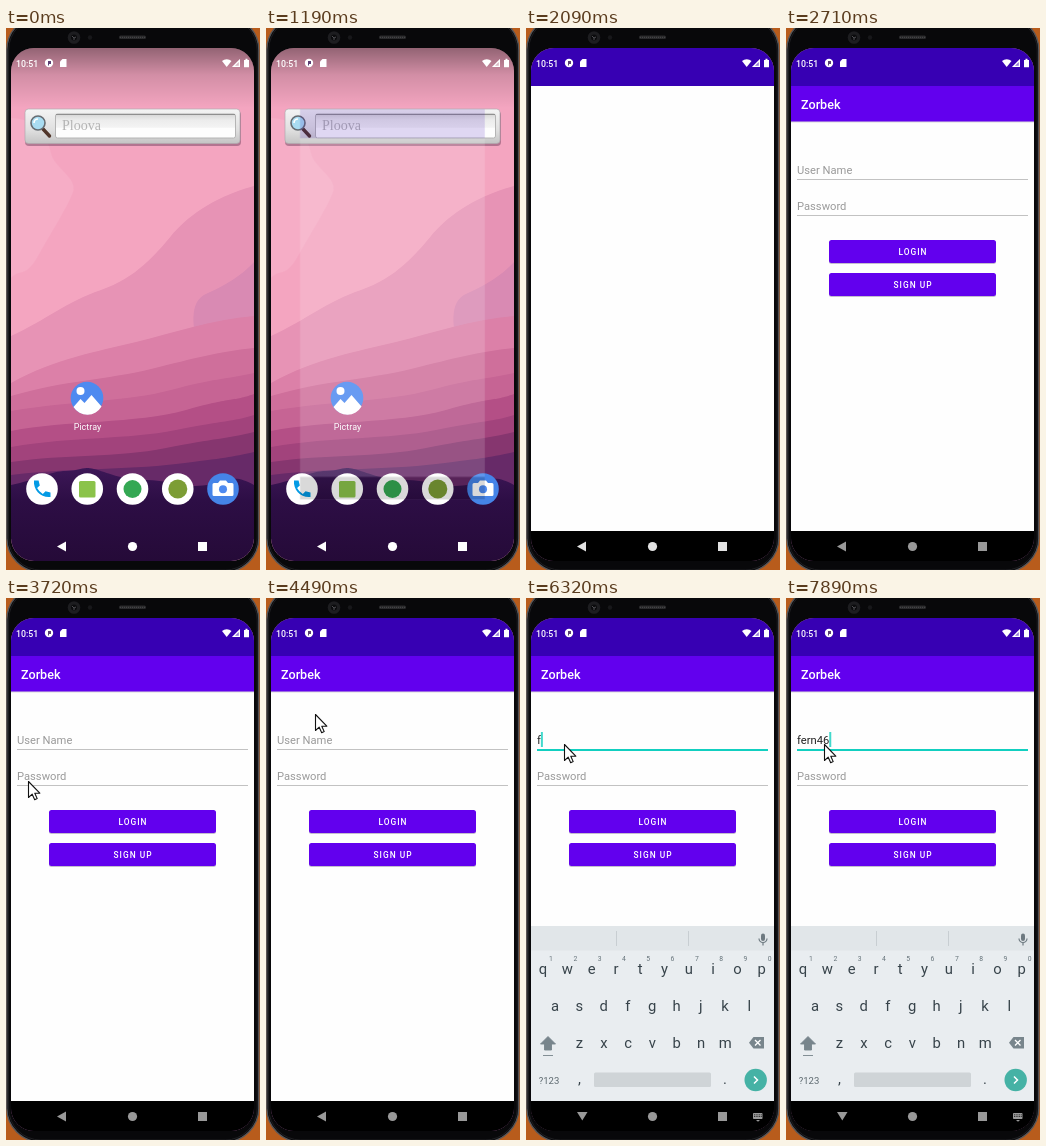
An HTML page for the animation above (8 s loop, 254 px wide and 542 px high).

```html
<!DOCTYPE html>
<html lang="en">
<head>
<meta charset="utf-8">
<title>Phone login</title>
<style>
  html, body { margin: 0; width: 100%; height: 100%; overflow: hidden; background: #b85c1c; }
  svg { display: block; width: 254px; height: 542px; font-family: Roboto, sans-serif; }
  .mid { text-anchor: middle; }
  .medium { font-weight: 500; }
  .serif { font-family: "Liberation Serif", "Noto Serif", serif; }
</style>
</head>
<body>
<svg viewBox="0 0 254 542">
  <defs>
    <clipPath id="screen"><rect x="5" y="20" width="243" height="513" rx="23"/></clipPath>
    <linearGradient id="scrim" x2="0" y2="1">
      <stop offset="0" stop-opacity=".4"/><stop offset=".45" stop-opacity=".14"/>
      <stop offset="1" stop-opacity="0"/>
    </linearGradient>
    <linearGradient id="hills" x2="0" y2="1">
      <stop offset="0" stop-color="#3d1757"/><stop offset=".35" stop-color="#2d0e45"/>
      <stop offset="1" stop-color="#250a38"/>
    </linearGradient>
    <linearGradient id="silver" x2="0" y2="1">
      <stop offset="0" stop-color="#f4f4f4"/><stop offset=".6" stop-color="#e0e0e0"/>
      <stop offset="1" stop-color="#c4c4c4"/>
    </linearGradient>
    <linearGradient id="inset" x2="0" y2="1">
      <stop offset="0" stop-color="#d6d6d6"/><stop offset=".25" stop-color="#ececec"/>
      <stop offset=".55" stop-color="#f3f3f3"/><stop offset=".6" stop-color="#fdfdfd"/>
    </linearGradient>
  </defs>

  <!-- phone body -->
  <rect x=".8" y="-12" width="252" height="556" rx="34" fill="#08080a" stroke="#55565a" stroke-width="1.4"/>
  <rect x="2.6" y="-10" width="248.6" height="552" rx="32" fill="none" stroke="#1e1e21"/>
  <circle cx="68" cy="9.5" r="6.3" fill="#1d1d20"/>
  <circle cx="68" cy="9.5" r="3" fill="#0b0b0d"/>
  <path d="M66 8l2 2 2-1M68 10v2" stroke="#55555a" stroke-width=".9" fill="none"/>
  <circle cx="84" cy="9.5" r="2.2" fill="#17171a"/>
  <rect x="113" y="7.5" width="27" height="3.6" rx="1.5" fill="#29292b"/>
  <path d="M114 9.3h25" stroke="#4b4b4e" stroke-dasharray="1 1"/>

  <g clip-path="url(#screen)">
    <g id="home">
      <rect x="5" y="20" width="243" height="513" fill="#f4a5c0"/>
      <path d="M5 90C30 90 42 110 45 125S72 150 67 164 45 205 32 228 14 240 5 250Z" fill="#f6adc6"/>
      <path d="M5 308C40 292 60 274 95 262S150 226 165 208 205 170 248 158V460H5Z" fill="#e793b5"/>
      <path d="M188 300C186 280 190 270 202 265 220 257 235 248 248 234V300Z" fill="#d98ab3"/>
      <path d="M5 355C50 330 90 324 130 314S205 292 248 288V460H5Z" fill="#dc80a8"/>
      <path d="M5 368C60 352 100 352 145 341S210 324 248 320V460H5Z" fill="#cf6f9b"/>
      <path d="M5 383C70 372 120 374 165 362S215 352 248 345V460H5Z" fill="#c66494"/>
      <path d="M5 403C60 392 130 396 180 382S225 374 248 366V460H5Z" fill="#b44f86"/>
      <path d="M5 419C70 408 120 412 170 402S225 394 248 387V470H5Z" fill="#a2437c"/>
      <path d="M5 434C60 426 110 430 160 420S220 411 248 404V480H5Z" fill="#86366f"/>
      <path d="M5 447C60 440 120 442 170 436S225 429 248 424V480H5Z" fill="#672a68"/>
      <path d="M5 457C30 452 45 443 60 443S75 438 88 441 115 452 140 452 180 462 205 456 230 448 248 457V533H5Z" fill="url(#hills)"/>
      <rect x="5" y="20" width="243" height="60" fill="url(#scrim)"/>

      <rect x="19" y="83" width="216" height="35" rx="4" fill="#512b46" opacity=".4"/>
      <rect x="19" y="81" width="215" height="34.5" rx="3.5" fill="url(#silver)" stroke="#b1abaf" stroke-width=".7"/>
      <rect x="49.5" y="86" width="180" height="24" rx="2" fill="url(#inset)" stroke="#b4b4b4"/>
      <path d="M50 86.500h179" stroke="#8f8f8f"/>
      <text class="serif" x="56" y="102" font-size="14" fill="#b4b4b4">Ploova</text>
      <path d="M37 101l6.500 7" stroke="#51362a" stroke-width="3.400" stroke-linecap="round"/>
      <circle cx="32" cy="95" r="7" fill="#a9dcf1" stroke="#666c72" stroke-width="1.600"/>
      <path d="M28 95a4 4 0 0 1 4-4" stroke="#fff" stroke-width="1.600" fill="none"/>

      <circle cx="81" cy="370" r="16.300" fill="#4e8af0"/>
      <circle cx="74.500" cy="363" r="4" fill="#fff"/>
      <path d="M67.500 379l7-8 4 4 7-8 10 11.500A16.300 16.300 0 0 1 67.500 379Z" fill="#fff"/>
      <text class="mid" x="81.500" y="402" font-size="9" fill="#fff">Pictray</text>

      <g id="dock" fill="#fff"></g>
      <path transform="translate(36 461)" d="M-8-8.500h4.600l1.200 5-2.700 2.600A14 14 0 0 0 .8 5l2.700-2.700 5 1.200V8C-1 9-9 1-8-8.500Z" fill="#039be5"/>
      <rect x="73" y="453" width="16.500" height="16.500" rx="1.500" fill="#8bc34a"/>
      <circle cx="126.500" cy="461" r="9" fill="#34a853"/>
      <circle cx="171.800" cy="461" r="9.500" fill="#7c9d35"/>
      <path d="M208 455h4l2-2.500h6l2 2.500h4q1.500 0 1.500 1.500v10q0 1.500-1.500 1.500h-18q-1.500 0-1.500-1.500v-10q0-1.500 1.500-1.500Z" fill="#fff"/>
      <circle cx="217" cy="461.300" r="4" fill="#4e8af0"/>
    </g>

    <g id="app">
      <rect x="5" y="20" width="243" height="513" fill="#fefefe"/>
      <rect x="5" y="20" width="243" height="38" fill="#3700b3"/>
      <rect x="5" y="503" width="243" height="30"/>
      <g id="login">
        <rect x="5" y="93" width="243" height="1.500" fill="#d9d9d9"/>
        <rect x="5" y="58" width="243" height="35.500" fill="#6200ee"/>
        <text class="medium" x="15" y="81" font-size="12.600" fill="#fff">Zorbek</text>
        <text id="hint" x="11" y="146" font-size="11.200" fill="#9a9a9a">User Name</text>
        <text x="11" y="182" font-size="11.200" fill="#9a9a9a">Password</text>
        <path d="M11 151.500h231M11 187.500h231" stroke="#c2c2c2"/>
        <g id="buttons"></g>
        <g id="typed" font-size="11.200" fill="#222"></g>
        <path id="focus" d="M11 152h231" stroke="#12cfc0" stroke-width="1.800"/>
        <g id="caret"><path d="M0 134v15" stroke="#03cdbb" stroke-width="1.500"/></g>
      </g>
    </g>

    <g id="keyboard">
      <rect x="5" y="328" width="243" height="175" fill="#e9edf0"/>
      <rect x="5" y="328" width="243" height="24.500" fill="#e1e6e9"/>
      <path d="M90.500 333v15M162.500 333v15" stroke="#c8ced2"/>
      <g stroke="#6d7980" fill="none">
        <path d="M237 337.500v3.500" stroke-width="4" stroke-linecap="round"/>
        <path d="M233 340.500a4 4 0 0 0 8 0M237 344.500v3" stroke-width="1.200"/>
      </g>
      <g id="words" class="mid" font-size="9" fill="#4a565c"></g>
      <g id="keys" class="mid" font-size="14.800" fill="#37434a"></g>
      <path d="M22 438.500l7.500 7.500h-4v6h-7v-6h-4ZM17 457.500h10" fill="#78858c" stroke="#78858c" stroke-width=".9"/>
      <path d="M227.500 439h10.500v11.500h-10.500l-4.500-5.700Z" fill="#78858c"/>
      <path d="M229 442l5.500 5.500m0-5.500l-5.500 5.500" stroke="#fff" stroke-width="1.300"/>
      <rect x="68" y="474.500" width="117" height="14.500" rx="1.500" fill="#cfd4d7"/>
      <circle cx="229.700" cy="482" r="11.200" fill="#45b2a5"/>
      <path d="M228 478.500l3.500 3.500-3.500 3.500" stroke="#fff" stroke-width="1.500" fill="none"/>
    </g>
    <rect id="navCover" x="5" y="503" width="243" height="30"/>

    <!-- status bar -->
    <g fill="#fff">
      <text class="medium" x="10" y="39" font-size="8.800">10:51</text>
      <circle cx="43" cy="35" r="4.200"/>
      <path d="M42 33h3v3h-2v1.500h-1Z" fill="#5b3f74"/>
      <path d="M56.500 31h4v8h-6.500v-5.500Z"/>
      <path d="M216 33a7 7 0 0 1 9.500 0l-4.800 6Z"/>
      <path d="M234 31v8h-8Z" opacity=".45"/>
      <path d="M234 31v8h-8ZM232.800 34l-3.800 3.800h3.800Z" fill-rule="evenodd"/>
      <path d="M238 32h1.500v-1.200h2V32h1.500v7.200h-5Z"/>
    </g>

    <!-- navigation bar -->
    <g id="nav">
      <path id="back" d="M60 513.500v10l-9-5Z"/>
      <path id="down" d="M51 514h10.500l-5.200 8.500Z"/>
      <circle cx="126.500" cy="518.500" r="4.600"/>
      <rect x="192" y="514" width="9" height="9"/>
      <g id="switcher">
        <rect x="227" y="515" width="9.500" height="6" rx=".8"/>
        <path d="M228 516.800h8M228 518.500h8" stroke="#000" stroke-width=".7" stroke-dasharray="1 .7"/>
        <path d="M230 522h4l-2 1.800Z"/>
      </g>
    </g>
  </g>

  <g id="pointer">
    <path d="M.5.500V16.500L4.200 13.200 6.700 18.700 9.200 17.600 6.800 12.200H11.800Z" fill="#fff" stroke="#111" stroke-width="1.100" stroke-linejoin="round"/>
  </g>
</svg>

<script>
const LOOP = 8000;
const $ = id => document.getElementById(id);

function add(parent, tag, attrs, text = "") {
  const el = document.createElementNS("http://www.w3.org/2000/svg", tag);
  for (const name in attrs) el.setAttribute(name, attrs[name]);
  el.textContent = text;
  parent.append(el);
  return el;
}

// Each step is [time in ms, value], held until the next step.
function play(el, prop, steps) {
  const frames = steps.map(([t, v]) => ({ offset: t / LOOP, [prop]: v, easing: "step-end" }));
  frames.push({ offset: 1, [prop]: steps.at(-1)[1] });
  el.animate(frames, { duration: LOOP, iterations: Infinity });
}

const show = (el, from, to = LOOP) =>
  play(el, "opacity", [[0, from ? 0 : 1], ...(from ? [[from, 1]] : []), ...(to < LOOP ? [[to, 0]] : [])]);
const move = (x, y) => `translate(${x}px, ${y}px)`;
const zoom = s => `translate(${126.5 * (1 - s)}px, ${276.5 * (1 - s)}px) scale(${s})`;

// Launcher dock
for (let i = 0; i < 5; i++)
  add($("dock"), "circle", { cx: 36 + i * 45.25, cy: 461, r: 15.8, ...(i === 4 && { fill: "#4584e8" }) });

// Login buttons
[["LOGIN", 212], ["SIGN UP", 245]].forEach(([label, y]) => {
  const box = { x: 43, width: 167, height: 23, rx: 2.5 };
  add($("buttons"), "rect", { ...box, y: y + 1, fill: "#c4bccf" });
  add($("buttons"), "rect", { ...box, y, fill: "#6200ee" });
  add($("buttons"), "text", {
    class: "mid medium", x: 127, y: y + 14.8, "font-size": 8.4, "letter-spacing": 1, fill: "#fff"
  }, label);
});

// Keyboard
const PITCH = 24.3;
[["qwertyuiop", 17, 376], ["asdfghjkl", 29, 413], ["zxcvbnm", 53.5, 450]].forEach(([row, x, y]) =>
  [...row].forEach((key, i) => add($("keys"), "text", { x: x + i * PITCH, y }, key)));
[..."1234567890"].forEach((digit, i) =>
  add($("keys"), "text", { x: 25 + i * PITCH, y: 363, "font-size": 6.8, fill: "#66737a" }, digit));
add($("keys"), "text", { x: 23, y: 485.5, "font-size": 9.5, fill: "#5d696f" }, "?123");
add($("keys"), "text", { x: 53.5, y: 486 }, ",");
add($("keys"), "text", { x: 199, y: 486 }, ".");
["fen", "fern", "fernery"].forEach((word, i) =>
  add($("words"), "text", { x: 54 + i * 72, y: 348 }, word));

// Typing, with the caret following the text
const typing = [[6320, "f"], [6440, "fe"], [6560, "fer"], [6710, "fern"], [7740, "fern46"]];
const caretPath = [[0, move(12, 0)]];
typing.forEach(([t, text], i) => {
  const el = add($("typed"), "text", { x: 11, y: 146 }, text);
  show(el, t, typing[i + 1]?.[0]);
  caretPath.push([t, move(12 + el.getComputedTextLength(), 0)]);
});
play($("caret"), "transform", caretPath);
play($("caret"), "opacity", [[0, 0], [5290, 1], [7230, 0], [7740, 1]]);
show($("hint"), 0, 6320);
show($("focus"), 5290);
show($("words"), 6710, 7890);

// App opening
play($("app"), "opacity", [[0, 0], [1190, .15], [1340, .9], [1460, 1]]);
play($("app"), "transform", [[0, zoom(.761)], [1340, zoom(.96)], [1460, zoom(1)]]);
play($("login"), "opacity", [[0, 0], [2210, .35], [2350, .8], [2470, 1]]);
play($("nav"), "fill", [[0, "#fff"], [1460, "#e2e2e2"], [2710, "#999"]]);

// Keyboard sliding in
show($("keyboard"), 5430);
play($("keyboard"), "transform", [[0, move(0, 175)], [5430, move(0, 130)], [5550, move(0, 55)], [5670, move(0, 14)], [5790, move(0, 0)]]);
show($("navCover"), 5430);
show($("back"), 0, 5430);
show($("down"), 5430);
show($("switcher"), 5430);

// Mouse
show($("pointer"), 3720);
play($("pointer"), "transform", [
  [0, 22, 183], [3840, 35, 118], [3980, 41, 95], [4100, 48, 79], [4230, 49, 104],
  [4370, 49, 110], [4490, 49, 116], [5020, 43, 130], [5140, 38, 141], [5430, 38, 146]
].map(([t, x, y]) => [t, move(x, y)]));
</script>
</body>
</html>
```
